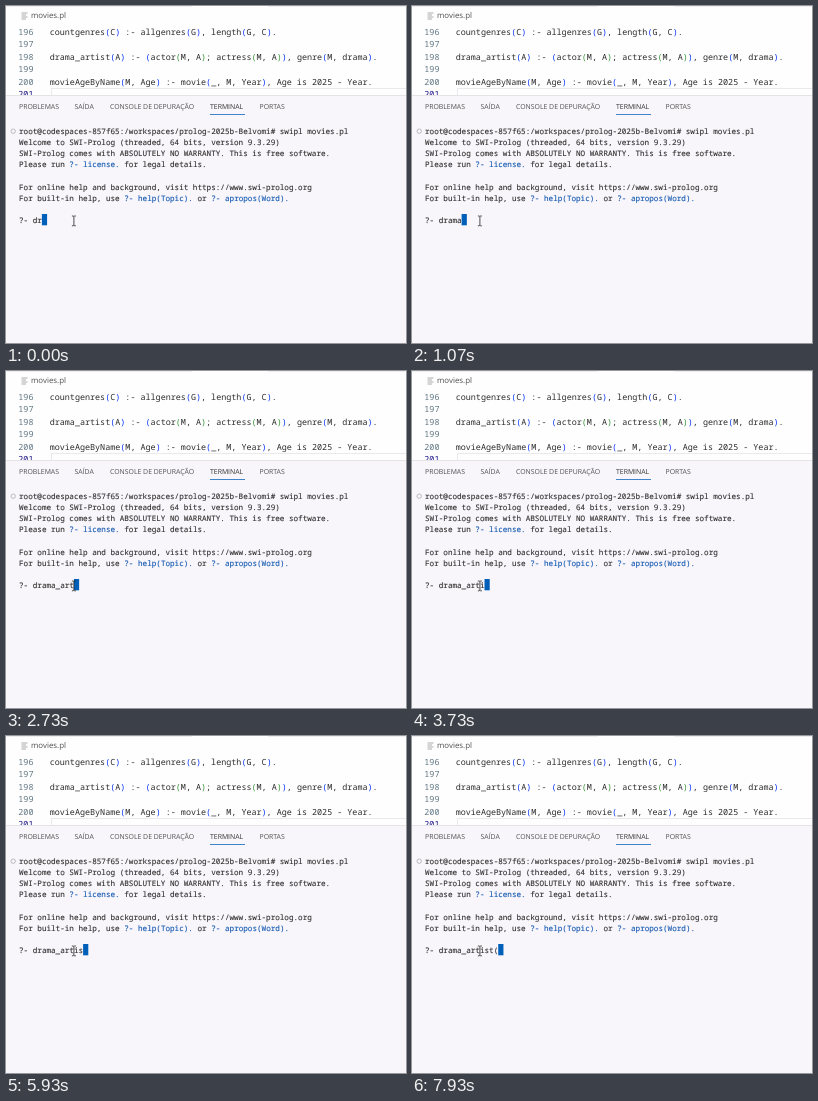
An HTML page that plays this animation: 400x337 px, repeating every 8 s.

```html
<!DOCTYPE html>
<html lang="pt">
<head>
<meta charset="utf-8">
<title>Terminal</title>
<style>
  html, body { margin: 0; width: 100%; height: 100%; overflow: hidden; background: #f8f6fa; }
  svg { display: block; width: 100vw; height: 100vh; }
  text { white-space: pre; text-rendering: geometricPrecision; fill: #3b3b3b; }
  .code, .term { font-family: "Noto Sans Mono", "DejaVu Sans Mono", monospace; }
  .code { font-size: 8.42px; }
  .code text { fill: #2c2c2c; }
  .code .num { fill: #5f7682; }
  .code .current { fill: #171184; }
  .code .level1 { fill: #0431fa; }
  .code .level2 { fill: #319331; }
  .term { font-size: 7.63px; }
  .term text { fill: #2c2c2c; stroke: #2c2c2c; stroke-width: .1; }
  .term .link { fill: #0f55b0; stroke: #0f55b0; }
  .ui { font-family: "Open Sans", "Noto Sans", sans-serif; }
  .ui text { fill: #505050; }
  .ui .active { fill: #333; }
</style>
</head>
<body>
<svg viewBox="0 0 400 337" preserveAspectRatio="none">
  <defs><clipPath id="editor"><rect width="400" height="89"/></clipPath></defs>
  <rect width="400" height="337" fill="#f8f6fa"/>
  <rect width="400" height="89" fill="#fffeff"/>
  <path d="M0 .5H186M262 .5H400" stroke="#ededef"/>
  <g clip-path="url(#editor)">
    <rect x="45.5" y="82.5" width="360" height="12" fill="none" stroke="#eaeaec"/>
    <g class="code" id="code"></g>
  </g>
  <path d="M0 89.5H400" stroke="#e4e3e6"/>

  <g class="ui">
    <path d="M15.5 7h6M15.5 9h4.5M15.5 11h6M15.5 13h4.5" stroke="#888" stroke-width=".7"/>
    <text x="25" y="12.4" font-size="7.9">movies.pl</text>
    <g font-size="6.9">
      <text x="13" y="103.3">PROBLEMAS</text>
      <text x="68.5" y="103.3">SAÍDA</text>
      <text x="104" y="103.3">CONSOLE DE DEPURAÇÃO</text>
      <text x="204" y="103.3" class="active">TERMINAL</text>
      <text x="253.5" y="103.3">PORTAS</text>
    </g>
    <path d="M204 108.5H239" stroke="#3f83c8"/>
  </g>

  <circle cx="7.2" cy="125.2" r="2.2" fill="none" stroke="#aaa" stroke-width=".8"/>
  <g class="term" id="term"></g>
  <rect id="cursor" y="208" width="5.2" height="11.3" fill="#005fb8"/>
  <path d="M65.9 210h1.3l.7.6.7-.6h1.3M67.9 210.6v8.6M65.9 219.8h1.3l.7-.6.7.6h1.3"
        fill="none" stroke="#222" stroke-width=".8"/>
</svg>
<script>
  const LOOP = 8000, LEFT = 13, CHAR = 4.578;
  const $ = id => document.getElementById(id);

  function addNode(parent, tag, content, attributes) {
    const el = document.createElementNS('http://www.w3.org/2000/svg', tag);
    for (const name in attributes) el.setAttribute(name, attributes[name]);
    el.textContent = content;
    return parent.appendChild(el);
  }

  const addText = (parent, x, y, content, cls = '') =>
    addNode(parent, 'text', content, { x, y, class: cls });

  // Colours each bracket by its nesting depth.
  function addCode(x, y, line) {
    const text = addText($('code'), x, y, '');
    let depth = 0;
    for (const part of line.split(/([()])/)) {
      if (part === '(') depth++;
      const bracket = part === '(' || part === ')';
      addNode(text, 'tspan', part, { class: bracket ? 'level' + depth : '' });
      if (part === ')') depth--;
    }
  }

  [
    'countgenres(C) :- allgenres(G), length(G, C).',
    '',
    'drama_artist(A) :- (actor(M, A); actress(M, A)), genre(M, drama).',
    '',
    'movieAgeByName(M, Age) :- movie(_, M, Year), Age is 2025 - Year.',
    ''
  ].forEach((line, i) => {
    const y = 28.9 + 12.4 * i;
    addText($('code'), 12.3, y, 196 + i, i === 5 ? 'current' : 'num');
    addCode(43.7, y, line);
  });

  const rowY = row => 128 + 11.13 * row;

  // Text between backticks is shown in the link colour.
  [
    'root@codespaces-857f65:/workspaces/prolog-2025b-Belvomi# swipl movies.pl',
    'Welcome to SWI-Prolog (threaded, 64 bits, version 9.3.29)',
    'SWI-Prolog comes with ABSOLUTELY NO WARRANTY. This is free software.',
    'Please run `?- license.` for legal details.',
    '',
    'For online help and background, visit https://www.swi-prolog.org',
    'For built-in help, use `?- help(Topic).` or `?- apropos(Word).`'
  ].forEach((line, row) => {
    let column = 0;
    line.split('`').forEach((part, i) => {
      addText($('term'), LEFT + column * CHAR, rowY(row), part, i % 2 ? 'link' : '');
      column += part.length;
    });
  });

  const query = '?- drama_artist(';
  const startLength = 5;
  const keyTimes = [200, 370, 700, 1250, 1530, 2070, 2470, 3600, 5130, 6600, 7400];
  const prompt = addText($('term'), LEFT, rowY(8), '');

  function draw(now) {
    const t = now % LOOP;
    const length = startLength + keyTimes.filter(k => k <= t).length;
    prompt.textContent = query.slice(0, length);
    $('cursor').setAttribute('x', LEFT + length * CHAR);
  }

  let start;
  function tick(now) {
    start ??= now;
    draw(now - start);
    requestAnimationFrame(tick);
  }
  draw(0);
  requestAnimationFrame(tick);
</script>
</body>
</html>
```
